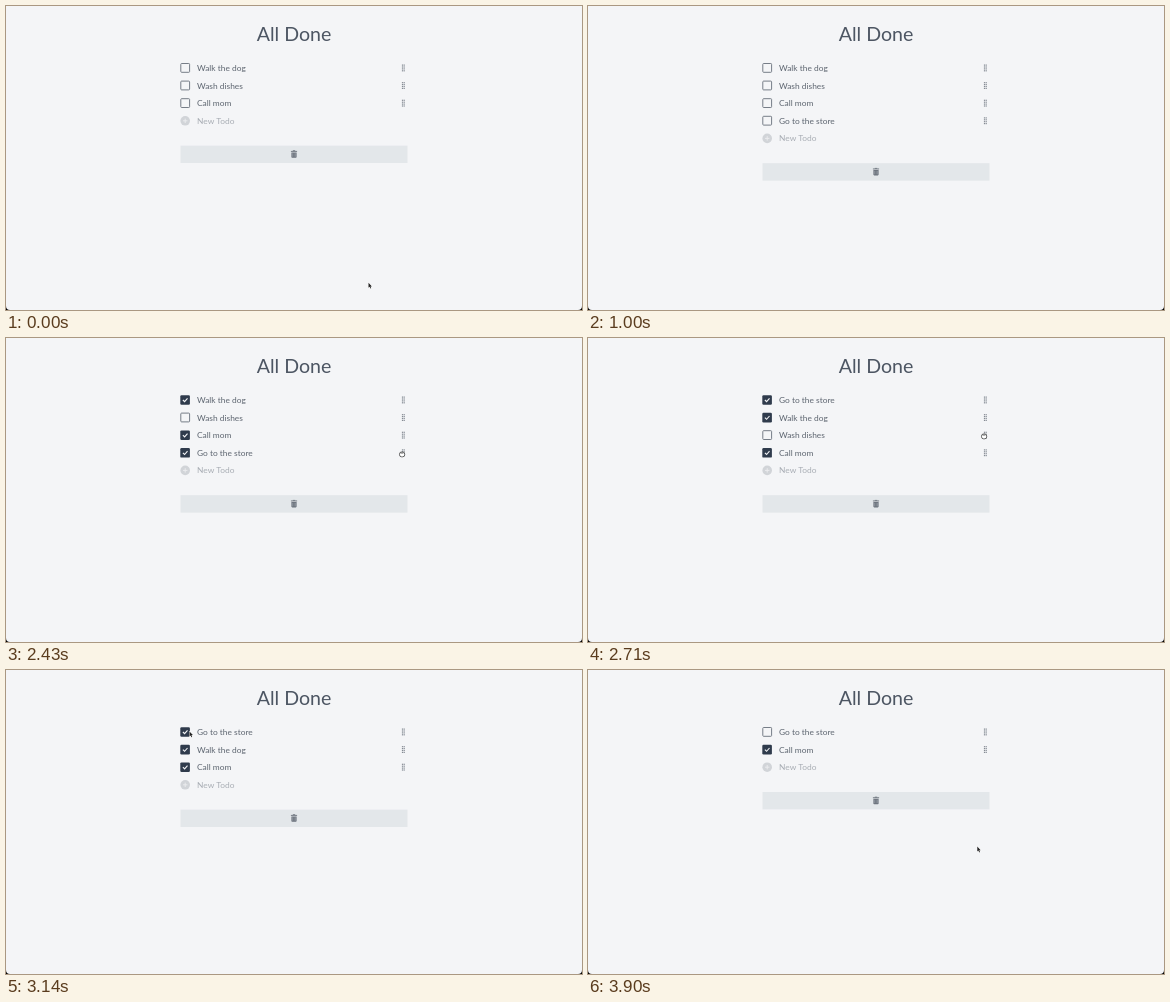
Write an HTML page with a canvas that moves like this. It is 576 px wide and 304 px high and loops after 4090 ms.

```html
<!DOCTYPE html>
<html lang="en">
<head>
<meta charset="utf-8">
<title>All Done</title>
<style>
  html, body { margin: 0; width: 100%; height: 100%; overflow: hidden; background: #f4f5f7; }
  canvas { display: block; width: 576px; height: 304px; }
</style>
</head>
<body>
<canvas id="stage"></canvas>
<script>
const W = 576, H = 304, LOOP = 4090;
const LEFT = 174.5, RIGHT = 401.5, TOP = 62, PITCH = 17.6;
const TITLE = '#4d5663', INK = '#5c646f', DARK = '#2f3b4c', MUTED = '#a8adb4';
const FONT = 'Lato, "Open Sans", sans-serif';

const canvas = document.getElementById('stage');
const ctx = canvas.getContext('2d');
const ratio = window.devicePixelRatio || 1;
canvas.width = W * ratio;
canvas.height = H * ratio;

const LABELS = { w: 'Walk the dog', d: 'Wash dishes', c: 'Call mom', g: 'Go to the store' };

// Each key is a todo; uppercase means checked, "_" is the gap left by a dragged row.
const scene = (at, rows, cursor, extra = {}) => ({ at, rows, cursor, ...extra });
const arrow = (x, y) => ({ draw: drawArrow, x, y });
const hand = (x, y) => ({ draw: drawHand, x, y });
const drag = (key, dx, y, over) => ({ drag: { key, dx, y }, over });

const SCENES = [
  scene(0, 'wdc', arrow(362.5, 276.8)),
  scene(140, 'wdc', arrow(300, 196)),
  scene(280, 'wdc', arrow(222, 114)),
  scene(430, 'wdc', arrow(488, 150), { typed: 'G' }),
  scene(570, 'wdc', null, { typed: 'Go to' }),
  scene(710, 'wdc', null, { typed: 'Go to the' }),
  scene(860, 'wdc', null, { typed: 'Go to the store' }),
  scene(1000, 'wdcg', null),
  scene(1140, 'wdcg', arrow(180, 62)),
  scene(1430, 'Wdcg', arrow(180, 62)),
  scene(1570, 'Wdcg', arrow(180, 80)),
  scene(1710, 'Wdcg', arrow(180, 97)),
  scene(1860, 'WdCg', arrow(180, 97)),
  scene(2000, 'WdCg', arrow(180, 114)),
  scene(2140, 'WdCG', arrow(180, 114)),
  scene(2290, 'WdCG', arrow(346, 102)),
  scene(2430, 'WdCG', hand(396, 116)),
  scene(2570, '_WdC', hand(399, 65), drag('G', 3, 64)),
  scene(2710, 'GWdC', hand(396, 98)),
  scene(2860, 'GWC_', hand(393, 163), drag('d', -5.5, 155.6, true)),
  scene(3000, 'GWC', arrow(300, 122)),
  scene(3140, 'GWC', arrow(183.5, 61.5)),
  scene(3290, 'gWC', arrow(183.5, 61.5)),
  scene(3430, 'gWC', hand(396, 81)),
  scene(3570, 'gC_', hand(378.5, 157.5), drag('W', -19.5, 153.6, true)),
  scene(3710, 'gC', arrow(383, 154.5)),
  scene(3900, 'gC', arrow(389.3, 176.6))
];

function text(label, x, baseline, color, size = 8.4, align = 'left') {
  ctx.font = `${size}px ${FONT}`;
  ctx.fillStyle = color;
  ctx.textAlign = align;
  ctx.fillText(label, x, baseline);
}

function polyline(points, color, width) {
  ctx.beginPath();
  points.forEach(([x, y]) => ctx.lineTo(x, y));
  ctx.strokeStyle = color;
  ctx.lineWidth = width;
  ctx.stroke();
}

function roundBox(x, y, w, h, r) {
  ctx.beginPath();
  ctx.roundRect(x, y, w, h, r);
}

function drawCheckbox(x, y, checked) {
  if (checked) {
    roundBox(x, y - 4.8, 9.6, 9.6, 1.2);
    ctx.fillStyle = DARK;
    ctx.fill();
    polyline([[x + 2.6, y], [x + 4.3, y + 1.7], [x + 7.2, y - 1.6]], '#f4f5f7', 1.1);
  } else {
    roundBox(x + 0.5, y - 4.5, 8.8, 8.8, 0.8);
    ctx.strokeStyle = '#767d87';
    ctx.lineWidth = 1;
    ctx.stroke();
  }
}

function drawGrip(x, y) {
  ctx.fillStyle = '#848a93';
  for (let row = 0; row < 4; row++) {
    for (let col = 0; col < 2; col++) {
      ctx.fillRect(x + col * 1.7, y - 3.5 + row * 1.9, 1.2, 1.2);
    }
  }
}

function drawTodo(key, y, dx = 0) {
  const checked = key !== key.toLowerCase();
  drawCheckbox(174.3 + dx, y, checked);
  text(LABELS[key.toLowerCase()], 191 + dx, y + 3, INK);
  drawGrip(395.9 + dx, y);
}

function drawNewTodo(y, typed) {
  ctx.beginPath();
  ctx.arc(179.2, y, 4.8, 0, Math.PI * 2);
  ctx.fillStyle = '#d1d4d8';
  ctx.fill();
  polyline([[177, y], [181.4, y]], '#eceef0', 0.9);
  polyline([[179.2, y - 2.2], [179.2, y + 2.2]], '#eceef0', 0.9);
  text(typed || 'New Todo', 191, y + 3, typed ? INK : MUTED);
}

function drawTrashBar(y, over) {
  ctx.fillStyle = over ? '#ffc9c9' : '#e3e7ea';
  ctx.fillRect(LEFT, y, RIGHT - LEFT, over ? 24 : 17.4);
  if (over) return;
  ctx.fillStyle = '#6b727c';
  ctx.fillRect(284.9, y + 5.3, 6.2, 0.9);
  ctx.fillRect(286.8, y + 4.7, 2.4, 0.8);
  roundBox(285.4, y + 6.8, 5.2, 5.4, [0, 0, 0.8, 0.8]);
  ctx.fill();
  ctx.fillStyle = '#a5abb2';
  for (let i = 0; i < 3; i++) ctx.fillRect(286.3 + i * 1.5, y + 7.6, 0.5, 3.6);
}

function drawArrow(x, y) {
  ctx.beginPath();
  [[0, 0], [0, 5], [1.1, 4], [1.9, 5.8], [2.7, 5.4], [1.9, 3.7], [3.4, 3.6]]
    .forEach(([px, py]) => ctx.lineTo(x + px, y + py));
  ctx.closePath();
  ctx.strokeStyle = '#fff';
  ctx.lineWidth = 0.9;
  ctx.stroke();
  ctx.fillStyle = '#222';
  ctx.fill();
}

function drawHand(x, y) {
  roundBox(x - 2.5, y - 2, 5.2, 4.8, 2);
  ctx.fillStyle = '#fff';
  ctx.fill();
  ctx.strokeStyle = '#444';
  ctx.lineWidth = 0.8;
  ctx.stroke();
  polyline([[x - 0.8, y - 2], [x - 0.8, y]], '#444', 0.6);
  polyline([[x + 0.8, y - 2], [x + 0.8, y]], '#444', 0.6);
}

function drawCorners() {
  const r = 4;
  ctx.fillStyle = '#000';
  for (const [x, dir] of [[0, 1], [W, -1]]) {
    ctx.beginPath();
    ctx.moveTo(x, H - r);
    ctx.arcTo(x, H, x + dir * r, H, r);
    ctx.lineTo(x, H);
    ctx.fill();
  }
}

function render(time) {
  const { rows, cursor, typed, drag: held, over } = SCENES.findLast(s => s.at <= time);
  const rowY = i => TOP + i * PITCH;

  ctx.setTransform(ratio, 0, 0, ratio, 0, 0);
  ctx.fillStyle = '#f4f5f7';
  ctx.fillRect(0, 0, W, H);
  text('All Done', 288, 35.2, TITLE, 19.6, 'center');

  [...rows].forEach((key, i) => { if (key !== '_') drawTodo(key, rowY(i)); });
  drawNewTodo(rowY(rows.length), typed);
  drawTrashBar(rowY(rows.length) + 24.8, over);
  if (held) drawTodo(held.key, held.y, held.dx);
  if (cursor) cursor.draw(cursor.x, cursor.y);
  drawCorners();
}

const start = performance.now();
function tick() {
  render((performance.now() - start) % LOOP);
  requestAnimationFrame(tick);
}
tick();
</script>
</body>
</html>
```
